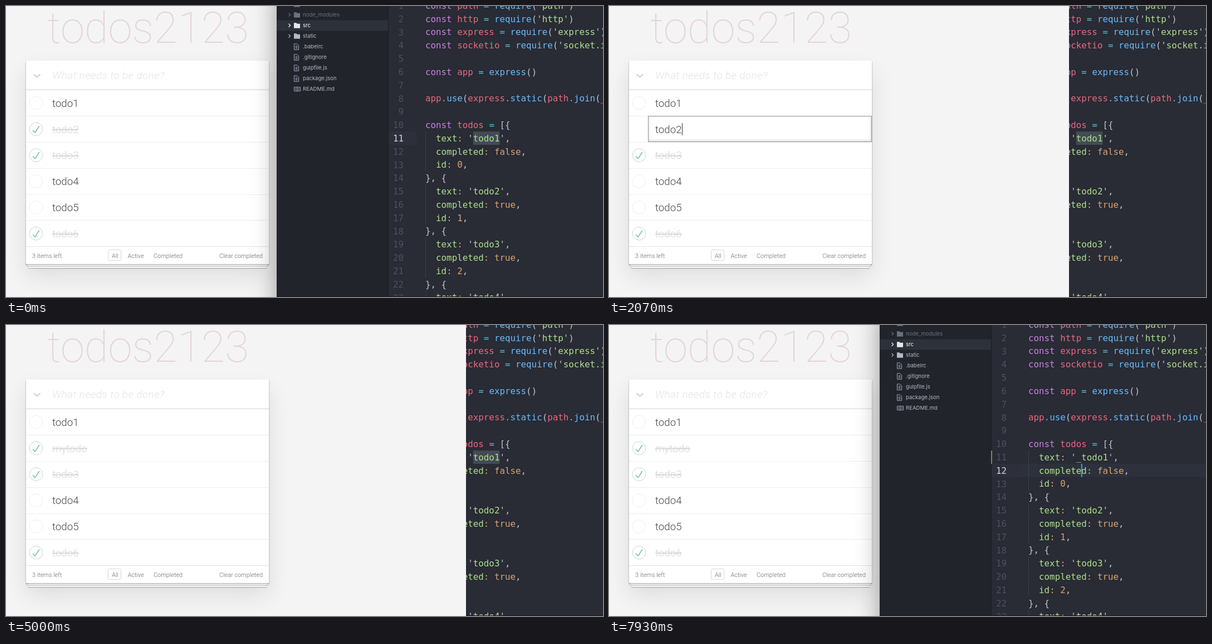
An HTML page that plays this animation: 1072 by 522 pixels, repeating every 8000 ms.

```html
<!DOCTYPE html>
<html lang="en">
<head>
<meta charset="utf-8">
<title>Todos</title>
<style>
  html, body { margin: 0; width: 100%; height: 100%; overflow: hidden; background: #292b35; }
  #stage { position: relative; width: 1072px; height: 522px; max-width: 100%; max-height: 100%; overflow: hidden; }
  .window { position: absolute; top: 0; height: 522px; overflow: hidden; }
  svg { position: absolute; left: 0; top: 0; }
  text { white-space: pre; }

  #browser { left: 0; width: 826px; background: #f4f4f4; font: 300 18.7px Roboto, sans-serif; }
  #browser.front { z-index: 2; }
  .card { position: absolute; left: 36px; top: 98px; width: 436px; height: 365px; background: #fff;
    box-shadow: 0 1px 1px rgba(0,0,0,.3), 0 5px 0 -2px #f6f6f6, 0 6px 1px -2px rgba(0,0,0,.25),
      0 11px 0 -4px #f6f6f6, 0 12px 1px -4px rgba(0,0,0,.25),
      0 2px 3px rgba(0,0,0,.2), 0 20px 39px rgba(0,0,0,.1); }
  .head { height: 53px; box-shadow: inset 0 -2px 1px rgba(0,0,0,.03); border-bottom: 1px solid #dcdcdc; box-sizing: border-box; }
  #field { position: absolute; left: 70px; top: 197px; width: 402px; height: 47px; box-sizing: border-box;
    background: #fff; border: 1.5px solid #999; box-shadow: inset 0 -1px 5px rgba(0,0,0,.2); }
  .title { font-weight: 100; font-size: 78px; fill: #e6d3d5; }
  .hint { font-style: italic; fill: #e3e3e3; letter-spacing: .5px; }
  .item { fill: #444; }
  .done { fill: #d6d6d6; text-decoration: line-through; }
  .foot { font-size: 10.9px; fill: #666; }

  #editor { z-index: 1; left: 486px; width: 586px; background: #292b35; }
  #shade { position: absolute; z-index: 1; left: 486px; top: -30px; width: 640px; height: 582px;
    box-shadow: 0 6px 40px rgba(0,0,0,.38); }
  .code { font: 15.83px "DejaVu Sans Mono", monospace; }
  .files { font: 9.6px Inter, sans-serif; }
</style>
</head>
<body>
<div id="stage">
  <div id="browser" class="window">
    <div class="card"><div class="head"></div></div>
    <svg id="page" width="826" height="522"></svg>
    <div id="field"></div>
    <svg width="826" height="522">
      <text id="typed" class="item" x="83" y="227.6"></text>
      <rect id="inputCaret" y="210" width="1" height="22" fill="#333"/>
    </svg>
  </div>
  <div id="shade"></div>
  <div id="editor" class="window"><svg id="ide" width="586" height="522" viewBox="486 0 586 522"></svg></div>
</div>

<script>
const $ = id => document.getElementById(id);
const show = (id, on) => $(id).style.visibility = on ? 'visible' : 'hidden';
const text = (x, y, s, attrs = '') => `<text x="${x}" y="${y}" ${attrs}>${s}</text>`;
const rect = (x, y, w, h, fill, attrs = '') =>
  `<rect x="${x}" y="${y}" width="${w}" height="${h}" fill="${fill}" ${attrs}/>`;

// Todo page
const ROW = 46.85;
const isDone = [0, 1, 1, 0, 0, 1];

function todoRow(done, i) {
  const y = 174 + ROW * i;
  const tick = done ? '<path fill="#60b5a3" d="M72 25L42 71 27 56l-4 4 20 20 34-52z"/>' : '';
  return `<g id="mark${i}" transform="translate(54 ${y}) scale(.236) translate(-50 -50)">
      <circle cx="50" cy="50" r="50" fill="none" stroke-width="4" stroke="${done ? '#c0d5d1' : '#ededed'}"/>${tick}</g>`
    + text(83, y + 6.7, 'todo' + (i + 1), `id="item${i}" class="${done ? 'done' : 'item'}"`)
    + rect(36, Math.round(y + 23), 436, 1, i < 5 ? '#ededed' : '#e4e4e4');
}

$('page').innerHTML = text(74, 66, 'todos2123', 'class="title"')
  + '<path d="M49.5 122.5L55.5 127.5 61.5 122.5" fill="none" stroke="#d9d9d9" stroke-width="2.6"/>'
  + text(83, 131, 'What needs to be done?', 'class="hint"')
  + isDone.map(todoRow).join('')
  + '<g class="foot">' + text(47, 451.5, '3 items left') + text(190, 451.5, 'All')
  + text(218.5, 451.5, 'Active') + text(265, 451.5, 'Completed')
  + text(461, 451.5, 'Clear completed', 'text-anchor="end"') + '</g>'
  + rect(183.5, 437.5, 23, 19, 'none', 'rx="2" stroke="#e2d3d3"');

// Code editor
const LINE = 23.8, CHAR = 9.53, CODE_X = 753;
const lineY = n => 23 + LINE * (n - 2);
const colors = ['#cb82e3', '#6abdfd', '#aee28a', '#dba472', '#5cc2d2', '#e9697f', '#c0c6d2'];
const syntax = /(const)|(require|use|static|join|express(?=\())|((?<=')[\w.]+|text|completed|id)|(true|false|\d|:)|([=.])|([a-z_]\w*)|(.)/g;
const paint = s => s.replace(syntax, (m, ...groups) =>
  `<tspan fill="${colors[groups.findIndex(g => g !== undefined)]}">${m}</tspan>`);

const load = (name, mod) => `const ${name} = require('${mod}')`;
const code = [load('path', 'path'), load('http', 'http'), load('express', 'express'),
  load('socketio', 'socket.io'), '', 'const app = express()', '',
  'app.use(express.static(path.join(__dirname', '', 'const todos = [{'];
[false, true, true].forEach((done, id) =>
  code.push(`  text: 'todo${id + 1}',`, `  completed: ${done},`, `  id: ${id},`, '}, {'));
code.push("  text: 'todo4',");

const codeLine = (s, i) => {
  const y = lineY(i + 1);
  const guide = s.startsWith('  ') ? rect(CODE_X, y - 12, 1, LINE, '#3b404b') : '';
  return guide + text(714, y + 5.7, i + 1, `id="num${i + 1}" text-anchor="end" fill="#4b5162"`)
    + text(CODE_X, y + 5.5, paint(s), `id="line${i + 1}"`);
};

// File tree
const files = ['node_modules', 'src', 'static', '.babelrc', '.gitignore', 'gulpfile.js', 'package.json', 'README.md'];
const folder = (y, c) => `<path fill="${c}" d="M517 ${y - 4.5}h4.5l1 1.5h5.5v8h-11z"/>`;
const page = y => `<path fill="none" stroke="#9da5b4" d="M517.5 ${y - 5}h5l3 3v7.5h-8zM519.5 ${y - 1}h4m-4 2h4m-4 2h4"/>`;
const book = y => `<path fill="none" stroke="#9da5b4" d="M517.5 ${y - 3.5}h11v7h-11zM523 ${y - 3.5}v8M519 ${y - 1}h2.5m-2.5 2h2.5m3-2h2.5m-2.5 2h2.5"/>`;

function fileRow(name, i) {
  const y = 15.7 + 19.05 * i;
  const c = ['#6b717d', '#ffffff', '#b4bac5'][i] || '#b4bac5';
  const chevron = `<path d="M507.5 ${y - 3}l3 3-3 3" fill="none" stroke="${c}" stroke-width="1.2"/>`;
  const icon = i < 3 ? chevron + folder(y, i == 1 ? '#e4e7ec' : c) : i < 7 ? page(y) : book(y);
  return icon + text(533, y + 3.4, name, `fill="${c}"`);
}

$('ide').innerHTML = rect(486, 0, 200, 522, '#21242b') + rect(486, 25.5, 200, 19, '#2d3139')
  + rect(686, 0, 1, 522, '#1b1d23')
  + '<g class="files">' + folder(-3.3, '#6b717d') + files.map(fileRow).join('') + '</g>'
  + rect(687, 0, 50, LINE, '#2d303b', 'id="gutter"') + rect(737, 0, 335, LINE, '#2d313c', 'id="current"')
  + rect(CODE_X + 9 * CHAR, lineY(11) - 12, 5 * CHAR, LINE, '#434b55', 'id="selection"')
  + rect(686, lineY(11) - 12, 2, LINE, '#8b8250', 'id="changed"')
  + '<g class="code">' + code.map(codeLine).join('') + '</g>'
  + rect(0, 0, 2, LINE, '#568cff', 'id="caret"')
  + rect(486, 521, 586, 1, '#211b27');

// Timeline, ms
const LOOP = 8000;
const browserUp = 1550, editOpen = 1930, editClose = 4170, editorUp = 5330;
const caretIn = 6400, underscore = 6800, moveDown = 7330;
const keys = [[editOpen, 'todo2'], [2330, 'todo'], [2430, 'tod'], [2530, 'to'], [2630, 't'], [2730, ''],
  [2900, 'm'], [3050, 'my'], [3270, 'myt'], [3400, 'myto'], [3530, 'mytod'], [3670, 'mytodo']];

function drawBrowser(t) {
  $('browser').className = 'window' + (t >= browserUp && t < editorUp ? ' front' : '');
  const editing = t >= editOpen && t < editClose;
  ['field', 'typed', 'inputCaret'].forEach(id => show(id, editing));
  ['mark1', 'item1'].forEach(id => show(id, !editing));
  $('item1').textContent = t < editClose ? 'todo2' : 'mytodo';
  const typed = $('typed');
  typed.textContent = (keys.findLast(k => t >= k[0]) || keys[0])[1];
  $('inputCaret').setAttribute('x', 83.5 + typed.getComputedTextLength());
}

function drawEditor(t) {
  const row = t < moveDown ? 11 : 12;
  const col = t < underscore ? 9 : 10;
  const top = lineY(row) - 12;
  const placed = t >= caretIn, edited = t >= underscore;
  ['gutter', 'current', 'caret'].forEach(id => $(id).setAttribute('y', top));
  $('caret').setAttribute('x', CODE_X + col * CHAR - .5);
  show('caret', placed);
  show('current', placed);
  show('selection', !placed);
  show('changed', edited);
  $('line11').innerHTML = paint(edited ? "  text: '_todo1'," : code[10]);
  [11, 12].forEach(n => $('num' + n).setAttribute('fill', n == row ? '#cfd4de' : '#4b5162'));
}

const start = performance.now();
function frame() {
  const t = (performance.now() - start) % LOOP;
  drawBrowser(t);
  drawEditor(t);
  requestAnimationFrame(frame);
}
frame();
</script>
</body>
</html>
```
